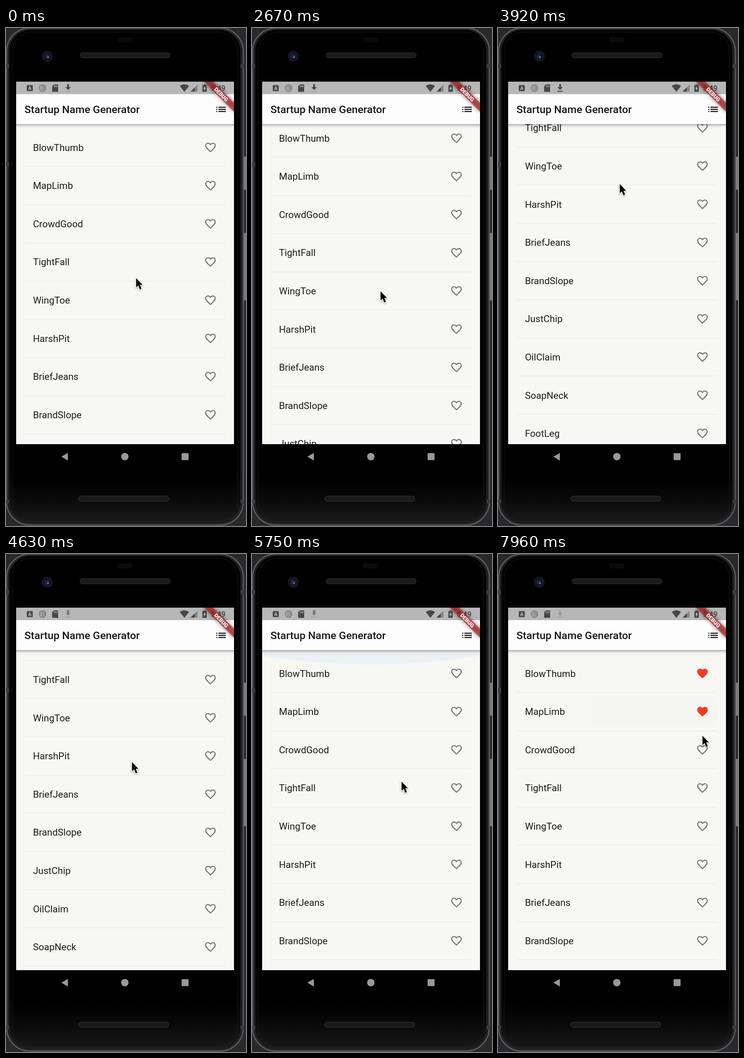
An HTML page with a canvas for the animation above (8 s loop, 520 by 1077 pixels).

```html
<!DOCTYPE html>
<html lang="en">
<head>
<meta charset="utf-8">
<title>Startup Name Generator</title>
<style>
html, body { margin: 0; width: 100%; height: 100%; overflow: hidden; background: #000; }
canvas { display: block; width: 520px; height: 1077px; }
</style>
</head>
<body>
<canvas id="stage" width="520" height="1077"></canvas>
<script>
const W = 520, H = 1077, LOOP = 8000, STEP = 1000 / 24;
const DP = 472 / 411.4;
const ROW = 82.6, FIRST = 258.3;
const SCREEN = { x: 22, y: 116, w: 472, h: 784 };
const BAR_END = 208;
const FONT = 'Roboto, "Open Sans", sans-serif';
const NAMES = ['BlowThumb', 'MapLimb', 'CrowdGood', 'TightFall', 'WingToe', 'HarshPit',
  'BriefJeans', 'BrandSlope', 'JustChip', 'OilClaim', 'SoapNeck', 'FootLeg'];
const HEART = new Path2D('M12 21.35l-1.45-1.32C5.4 15.36 2 12.28 2 8.5 2 5.42 4.42 3 7.5 3' +
  'c1.74 0 3.41.81 4.5 2.09C13.09 3.81 14.76 3 16.5 3 19.58 3 22 5.42 22 8.5' +
  'c0 3.78-3.4 6.86-8.55 11.54z');
const ARROW = new Path2D('M0 0V20L4.6 15.8L8 24.2L11.6 22.7L8.1 14.5H13.8Z');

// Keys: time, then values
const POINTER = [[0, 282, 541], [700, 296, 478], [1540, 307, 419], [2350, 284, 588], [2500, 282, 590],
  [3458, 262, 305], [3620, 262, 296], [4120, 266, 378], [4625, 273, 450], [5200, 296, 676],
  [5750, 324, 492], [6500, 412, 372], [7083, 443, 331], [7270, 444, 259], [7400, 444, 260],
  [7620, 442, 340], [7740, 442, 341], [7958, 443, 393], [8000, 443, 396]];
const SCROLL = [[0, 0], [2500, 0], [3458, 273.2], [3800, 290], [4200, 290], [4625, 234.4], [5180, 0], [8000, 0]];
const TAPS = [7340, 7680];

const clamp = (v, lo = 0, hi = 1) => Math.min(hi, Math.max(lo, v));

// Monotone cubic interpolation through keys
function track(keys, t, c = 1) {
  let i = 0;
  while (i < keys.length - 2 && t >= keys[i + 1][0]) i++;
  const slope = k => k < 0 || k > keys.length - 2 ? 0 :
    (keys[k + 1][c] - keys[k][c]) / (keys[k + 1][0] - keys[k][0]);
  const tangent = k => {
    const a = slope(k - 1), b = slope(k);
    return a * b > 0 ? 2 * a * b / (a + b) : 0;
  };
  const [a, b] = [keys[i], keys[i + 1]];
  const d = b[0] - a[0], u = clamp((t - a[0]) / d), v = 1 - u;
  return a[c] * (1 + 2 * u) * v * v + d * tangent(i) * u * v * v +
    b[c] * u * u * (3 - 2 * u) - d * tangent(i + 1) * u * u * v;
}

const canvas = document.getElementById('stage');
const screenCtx = canvas.getContext('2d');
let g = screenCtx;

function rect(x, y, w, h, fill) {
  g.fillStyle = fill;
  g.fillRect(x, y, w, h);
}
function round(x, y, w, h, r, fill, line, width = 1) {
  g.beginPath();
  g.roundRect(x, y, w, h, r);
  if (fill) { g.fillStyle = fill; g.fill(); }
  if (line) { g.strokeStyle = line; g.lineWidth = width; g.stroke(); }
}
function circle(x, y, r, fill) {
  g.fillStyle = fill;
  g.beginPath();
  g.arc(x, y, r, 0, 7);
  g.fill();
}
function poly(points, fill) {
  g.fillStyle = fill;
  g.beginPath();
  points.forEach(([x, y]) => g.lineTo(x, y));
  g.closePath();
  g.fill();
}
function text(str, x, y, font, fill, align = 'left') {
  g.font = font + ' ' + FONT;
  g.fillStyle = fill;
  g.textAlign = align;
  g.fillText(str, x, y);
}
function fade(horizontal, from, to, ...stops) {
  const grad = horizontal ? g.createLinearGradient(from, 0, to, 0) : g.createLinearGradient(0, from, 0, to);
  stops.forEach((s, i) => grad.addColorStop(i / (stops.length - 1), s));
  return grad;
}
function layer(draw) {
  const c = document.createElement('canvas');
  c.width = W;
  c.height = H;
  g = c.getContext('2d');
  draw();
  g = screenCtx;
  return c;
}

function drawBody() {
  rect(0, 0, W, H, '#29292b');
  // side buttons
  [[278, 72], [443, 146]].forEach(([y, h]) =>
    round(514, y, 8, h, 2, fade(true, 514, 520, '#3a3a3c', '#8e8e90', '#6a6a6c'), '#4a4a4c'));
  // metal rim, then glass that brightens towards the bottom
  round(1.5, 0, 512.5, 1075, 50, '#1b1b1d', '#58585b', 3);
  round(6, 3, 503, 1069, 47, fade(false, 960, 1072, '#040404', '#0c0c0c', '#1d1d1e'), '#252528', 2);
  round(14, 9, 487, 1056, 41, fade(false, 975, 1065, '#000', '#0a0a0a', '#181819'), '#161618', 1);
  [[0, 78, 9], [0, 290, 10], [508, 78, 9], [0, 1020, 8], [508, 1020, 8]].forEach(([x, y, h]) =>
    rect(x, y, 7, h, '#3c3c3e'));
  // sensor, camera, speakers
  round(241, 20, 33, 11, 4, '#0b0b0f');
  circle(89.5, 61, 11.5, '#1b1b1f');
  circle(89.5, 61, 9, '#11131f');
  circle(89, 61, 5.5, '#1c2444');
  circle(91, 63, 1.8, '#7583c4');
  round(160.5, 53.5, 195, 11, 5, '#1a1a1c', '#38383b');
  round(157.5, 1012.5, 195, 11, 5, '#19191b', '#38383c');
  // navigation buttons
  poly([[120, 927], [134, 919], [134, 935.5]], '#999');
  circle(257.5, 927, 8, '#999');
  round(380.5, 919.5, 15, 15, 1, '#999');
}

function drawStatus() {
  const ink = '#464646';
  rect(SCREEN.x, SCREEN.y, SCREEN.w, 27, '#b7b7b7');
  round(45, 123.5, 13, 13, 1.5, ink);
  text('A', 51.5, 133.5, 'bold 10px', '#c4c4c4', 'center');
  circle(79, 130, 8, '#777');
  circle(79, 130, 6.6, fade(true, 72, 86, '#a8a8a8', '#8b8b8b'));
  poly([[104, 122], [113, 122], [113, 138], [100, 138], [100, 126]], ink);
  [104, 107, 110].forEach(x => rect(x, 124, 1.5, 4, '#b0b0b0'));
  // wifi
  g.fillStyle = ink;
  g.beginPath();
  g.moveTo(386.5, 138);
  g.lineTo(376.5, 125.5);
  g.quadraticCurveTo(386.5, 118, 396.5, 125.5);
  g.fill();
  // cell signal
  poly([[415, 122.5], [415, 137.5], [400, 137.5]], '#858585');
  poly([[409, 128.5], [409, 137.5], [400, 137.5]], ink);
  // battery
  rect(428.5, 122, 4, 2, ink);
  round(425.5, 123.5, 9.5, 14.5, 1, ink);
  poly([[431, 125], [427.5, 131.5], [429.8, 131.5], [429.5, 136], [433, 129.5], [430.7, 129.5]], '#c4c4c4');
  text('5:49', 444, 135.7, '500 16px', ink);
}

function drawBanner() {
  g.save();
  g.translate(SCREEN.x + SCREEN.w, SCREEN.y);
  g.rotate(Math.PI / 4);
  // shadow alone, cast by a strip outside the view
  g.shadowColor = 'rgba(0,0,0,.5)';
  g.shadowBlur = 9;
  g.shadowOffsetX = 2000;
  const far = 2000 * Math.SQRT1_2;
  rect(-46 - far, 32.1 + far, 92, 13.8, '#000');
  g.shadowColor = 'transparent';
  rect(-46, 32.1, 92, 13.8, 'rgba(183,28,28,.63)');
  text('DEBUG', 0, 43.2, '900 11.7px', '#fff', 'center');
  g.restore();
}

function drawHeader() {
  rect(SCREEN.x, BAR_END, SCREEN.w, 9,
    fade(false, BAR_END, BAR_END + 9, 'rgba(0,0,0,.36)', 'rgba(0,0,0,.12)', 'rgba(0,0,0,.03)', 'rgba(0,0,0,0)'));
  rect(SCREEN.x, 143, SCREEN.w, BAR_END - 143, '#fdfdfd');
  text('Startup Name Generator', 40, 184.4, `500 ${20 * DP}px`, '#161616');
  for (let i = 0; i < 3; i++) {
    const y = 170.2 + i * 4 * DP;
    rect(455.6, y, 2 * DP, 2 * DP, '#111');
    rect(460.2, y, 14 * DP, 2 * DP, '#111');
  }
  drawStatus();
}

function clipScreen() {
  g.beginPath();
  g.rect(SCREEN.x, SCREEN.y, SCREEN.w, SCREEN.h);
  g.clip();
}

function heart(y, liked) {
  g.save();
  g.translate(443 - 12 * DP, y - 12 * DP);
  g.scale(DP, DP);
  if (liked) {
    g.fillStyle = '#f53a22';
    g.fill(HEART);
  } else {
    g.clip(HEART);
    g.strokeStyle = '#777';
    g.lineWidth = 4;
    g.stroke(HEART);
  }
  g.restore();
}

function ripple(y, age) {
  if (age < 0 || age > 330) return;
  const p = age / 330;
  g.save();
  g.beginPath();
  g.rect(40, y - 32.5, 435, 65);
  g.clip();
  rect(40, y - 32.5, 435, 65, `rgba(0,0,0,${.03 * Math.max(0, 1 - p * 1.3)})`);
  circle(443, y, 20 + 260 * p, `rgba(0,0,0,${.06 * (1 - p)})`);
  g.restore();
}

function drawList(t) {
  const scroll = track(SCROLL, t);
  rect(SCREEN.x, 143, SCREEN.w, 757, '#f7f7f4');
  NAMES.forEach((name, i) => {
    const y = FIRST + i * ROW - scroll;
    if (y < 150 || y > 960) return;
    if (i < TAPS.length) ripple(y, t - TAPS[i]);
    text(name, 58.4, Math.round(y + 7.3), `${18 * DP}px`, '#1c1c1c');
    heart(y, t > TAPS[i] + 40);
    rect(40, Math.round(y + 40.7), 435, 1, '#e7e8e6');
  });
}

function drawGlow(t) {
  const power = clamp((t - 5150) / 170) * clamp((5900 - t) / 550);
  if (!power) return;
  const depth = 16 + 54 * power;
  g.save();
  g.beginPath();
  g.rect(SCREEN.x, BAR_END, SCREEN.w, 100);
  g.clip();
  circle(258, BAR_END + depth - 1500, 1500, `rgba(33,150,243,${.18 * power})`);
  g.restore();
}

function drawDownload(t) {
  const phase = t % 1200;
  const full = phase < 450;
  const ink = full ? '#464646' : '#9c9c96';
  rect(132.5, 121.5, 4, 7, ink);
  poly([[128.5, 128], [140.5, 128], [134.5, 134]], ink);
  rect(128.5, 135.8, 12, 2, full && phase > 300 ? '#464646' : '#a6a694');
  if (phase > 900) rect(132.5, 121.5, 4, 9, '#6a6a64');
}

function drawPointer(t) {
  g.save();
  g.translate(track(POINTER, t, 1), track(POINTER, t, 2));
  g.shadowColor = 'rgba(0,0,0,.35)';
  g.shadowBlur = 4;
  g.shadowOffsetY = 2;
  g.lineWidth = 2;
  g.lineJoin = 'round';
  g.strokeStyle = '#fff';
  g.stroke(ARROW);
  g.shadowColor = 'transparent';
  g.fillStyle = '#000';
  g.fill(ARROW);
  g.restore();
}

const body = layer(drawBody);
const header = layer(drawHeader);
const banner = layer(() => { clipScreen(); drawBanner(); });

function frame(now) {
  // 24 pictures a second, as in a screen recording
  const t = Math.floor((now % LOOP) / STEP + .15) * STEP;
  g.drawImage(body, 0, 0);
  g.save();
  clipScreen();
  drawList(t);
  drawGlow(t);
  g.drawImage(header, 0, 0);
  drawDownload(t);
  g.drawImage(banner, 0, 0);
  g.restore();
  drawPointer(t);
  requestAnimationFrame(frame);
}
requestAnimationFrame(frame);
</script>
</body>
</html>
```
